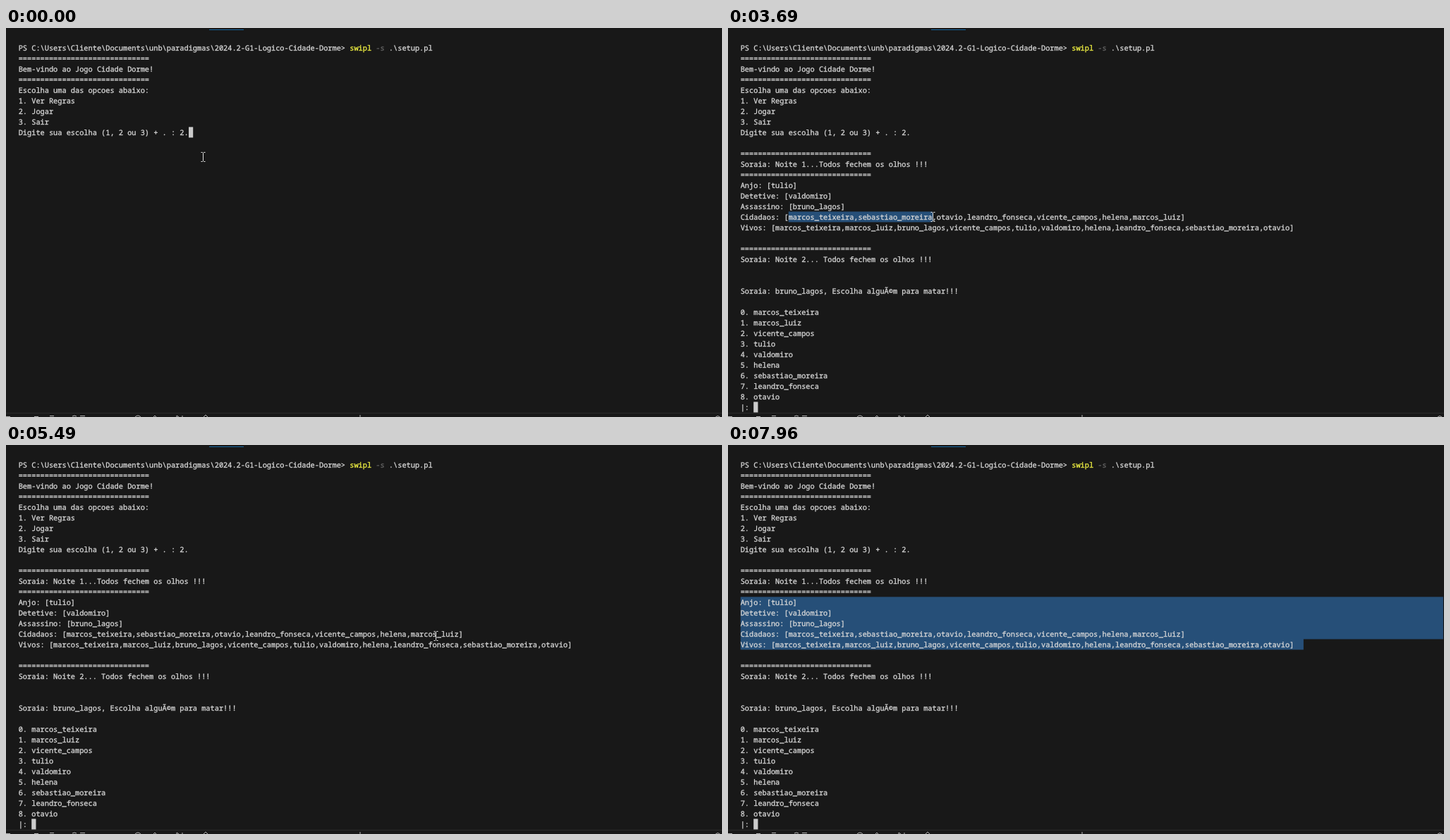
Write an HTML page that moves like this. It is 1015x552 px and loops after 8000 ms.

```html
<!DOCTYPE html>
<html lang="pt">
<head>
<meta charset="utf-8">
<title>Cidade Dorme</title>
<style>
  html, body { margin: 0; width: 100%; height: 100%; overflow: hidden; background: #181818; }
  svg { display: block; }
  text {
    font: 10.3125px "Noto Sans Mono", "DejaVu Sans Mono", monospace;
    color: #d8d8d8;
    fill: currentColor;
    stroke: currentColor;
    stroke-width: 0.3px;
    white-space: pre;
    text-rendering: geometricPrecision;
  }
  .cmd, .flag { fill: currentColor; stroke: currentColor; }
  .cmd { color: #f5f543; }
  .flag { color: #666666; }
</style>
</head>
<body>
<svg width="1015" height="552" viewBox="0 0 1015 552">
  <rect width="1015" height="552" fill="#181818"/>
  <rect x="288" y="2" width="49" height="1" fill="#14659f"/>
  <path d="M0 546.5H1015" stroke="#2b2b2b"/>
  <path d="M0 551.5h6M40 551.5h6M62 550.5h6M94 551q3-2 6 0M105 550.5h7M183 552q4-4 8 0M209 552l2-2 2 2
    M242 552v-2l3 2M250 552v-2M280 552l3-3 3 3M502 549v3M1006 552q3-3 6 0" fill="none" stroke="#b4b4b4"/>
  <path id="sel" fill="#264f78"/>
  <rect id="caret" width="6.2" height="15" fill="#cccccc"/>
  <g id="intro"></g>
  <g id="game"></g>
  <path id="mouse" d="M-3-6.5H-1L0-5.5 1-6.5H3M0-5.5V5.5M-3 6.5H-1L0 5.5 1 6.5H3"
    fill="none" stroke="#e0e0e0"/>
</svg>
<script>
const LOOP = 8000, LEFT = 17.7, TOP = 20.5, CELL = 6.1875, ROW = 15, COLS = 161;
const START = 1220, STEP = 137;
const $ = id => document.getElementById(id);
const colX = c => LEFT + c * CELL;
const rowY = r => TOP + r * ROW;
const rule = "=".repeat(30);

const host = "Soraia", angel = "tulio", sleuth = "valdomiro", killer = "bruno_lagos";
const [m1, m2, v, h, s, l, o] = ["marcos_teixeira", "marcos_luiz", "vicente_campos", "helena",
  "sebastiao_moreira", "leandro_fonseca", "otavio"];

const intro = [
  "PS C:\\Users\\Cliente\\Documents\\unb\\paradigmas\\2024.2-G1-Logico-Cidade-Dorme&gt; " +
    '<tspan class="cmd">swipl</tspan> <tspan class="flag">-s</tspan> .\\setup.pl',
  rule, "Bem-vindo ao Jogo Cidade Dorme!", rule,
  "Escolha uma das opcoes abaixo:", "1. Ver Regras", "2. Jogar", "3. Sair",
  "Digite sua escolha (1, 2 ou 3) + . : 2."
];
const game = [
  "", rule, `${host}: Noite 1...Todos fechem os olhos !!!`, rule,
  `Anjo: [${angel}]`, `Detetive: [${sleuth}]`, `Assassino: [${killer}]`,
  `Cidadaos: [${[m1, s, o, l, v, h, m2]}]`,
  `Vivos: [${[m1, m2, killer, v, angel, sleuth, h, l, s, o]}]`,
  "", rule, `${host}: Noite 2... Todos fechem os olhos !!!`, "", "",
  `${host}: ${killer}, Escolha alguÃ©m para matar!!!`, "",
  ...[m1, m2, v, angel, sleuth, h, s, l, o].map((name, i) => `${i}. ${name}`),
  "|: "
];
const lines = [...intro, ...game];

function print(group, rows, first) {
  group.innerHTML = rows.map((row, i) =>
    `<text x="${LEFT}" y="${rowY(first + i) + 11.1}">${row}</text>`).join("");
}
print($("intro"), intro, 0);
print($("game"), game, intro.length);

// Turning points of the pointer: time, x, y
const turns = [
  [1083, 279, 183], [1494, 462, 262], [1631, 435, 303], [2042, 123, 268], [2590, 105, 272],
  [3300, 105, 272], [3686, 290, 268], [4097, 466, 270], [4508, 604, 283], [4782, 609, 271],
  [5467, 609, 271], [5741, 575, 351], [6050, 575, 351], [6426, 523, 479], [6974, 806, 270],
  [7111, 813, 299], [7248, 795, 278], [7385, 698, 268], [7830, 2, 229], [7933, -20, 223]
];

function pointer(t) {
  const i = turns.findIndex(k => k[0] > t);
  if (i === 0) return turns[0].slice(1);
  if (i < 0) return turns.at(-1).slice(1);
  const [t0, x0, y0] = turns[i - 1], [t1, x1, y1] = turns[i];
  const p = (t - t0) / (t1 - t0);
  return [x0 + (x1 - x0) * p, y0 + (y1 - y0) * p];
}

function cellAt([x, y]) {
  return [Math.floor((y - TOP) / ROW), Math.max(0, Math.round((x - LEFT) / CELL))];
}

function wordEnd([row, col]) {
  const rest = lines[row].slice(col).search(/\W/);
  return [row, rest < 0 ? lines[row].length : col + rest];
}

function selectionPath([r0, c0], [r1, c1]) {
  let d = "";
  for (let r = r0; r <= r1; r++) {
    const a = colX(r === r0 ? c0 : 0), b = colX(r === r1 ? c1 : COLS);
    d += `M${a} ${rowY(r)}H${b}v${ROW}H${a}z`;
  }
  return d;
}

// First drag grows by whole words; the second runs backwards, a little behind the pointer
function selection(t) {
  if (t >= 3130 && t < 5460) return selectionPath([16, 11], wordEnd(cellAt(pointer(t))));
  if (t >= 7240) return selectionPath(cellAt(pointer(t - 78)), [17, 129]);
  return "";
}

function draw(t) {
  const started = t >= 690;
  const now = START + Math.floor((t - START) / STEP) * STEP;
  const [x, y] = pointer(now);
  $("game").style.display = started ? "" : "none";
  $("caret").setAttribute("x", colX(started ? 3 : 39));
  $("caret").setAttribute("y", rowY(started ? 34 : 8));
  $("sel").setAttribute("d", selection(now));
  $("mouse").setAttribute("transform", `translate(${Math.round(x) + 0.5} ${Math.round(y)})`);
}

function tick() {
  draw(performance.now() % LOOP);
  requestAnimationFrame(tick);
}
tick();
</script>
</body>
</html>
```
